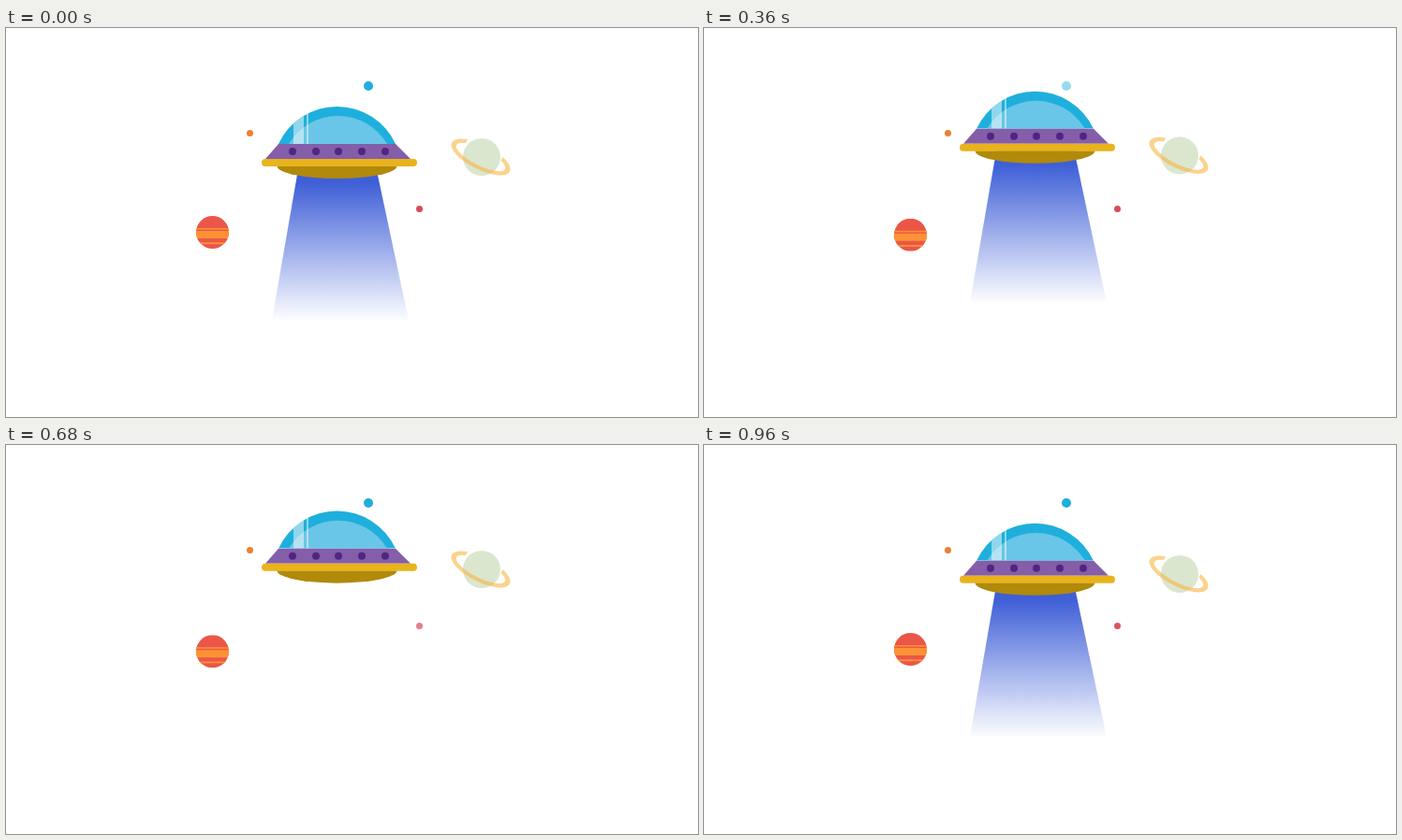
These frames come from a looping animation (739x416 px, 1 s). An HTML page:

```html
<!DOCTYPE html>
<html lang="en">
<head>
<meta charset="utf-8">
<title>Flying saucer</title>
<style>
  html, body { margin: 0; width: 100%; height: 100%; overflow: hidden; background: #fff; }
  svg { display: block; width: 739px; height: 416px; }
</style>
</head>
<body>
<svg viewBox="0 0 739 416">
  <defs>
    <linearGradient id="glow" gradientUnits="userSpaceOnUse" x1="0" y1="165" x2="0" y2="314">
      <stop offset="0" stop-color="#3f5fd7"/>
      <stop offset="1" stop-color="#3f5fd7" stop-opacity="0"/>
    </linearGradient>
    <clipPath id="domeClip"><path d="M291 124A68.8 68.8 0 0 1 416 124Z"/></clipPath>
    <clipPath id="marsClip"><circle cx="220.5" cy="218.5" r="17.5"/></clipPath>
  </defs>

  <circle id="cyan" cx="387" cy="62" r="5" fill="#1fafdc"/>
  <circle id="orange" cx="260.5" cy="112.5" r="3.5" fill="#ec8036"/>
  <circle id="red" cx="441.5" cy="193.5" r="3.5" fill="#d94a5b"/>

  <g id="mars" clip-path="url(#marsClip)">
    <rect x="203" y="201" width="35" height="35" fill="#eb5648"/>
    <g fill="#fd9235">
      <rect x="203" y="214" width="35" height="1.6"/>
      <rect x="203" y="217" width="35" height="8"/>
      <rect x="203" y="229.3" width="35" height="1.8"/>
    </g>
  </g>

  <g id="saturn">
    <circle cx="508" cy="138" r="20" fill="#dbe6cf"/>
    <!-- Open ring: the far side stops short of the globe -->
    <path transform="translate(507 138) rotate(26.6)" fill="#f9b443" fill-opacity=".6"
      d="M-21 -10.6A34.6 13.3 0 1 0 21 -10.6L21 -6.2A29 9 0 1 1 -21 -6.2Z"/>
  </g>

  <path id="beam" d="M312.5 148H395L430 312.5H284Z" fill="url(#glow)"/>

  <g id="ufo">
    <g clip-path="url(#domeClip)">
      <rect x="285" y="80" width="137" height="44" fill="#1fafdc"/>
      <path d="M302 124A61 61 0 0 1 407 124Z" fill="#69c6e8"/>
      <path d="M307 84H318V124H307ZM321 84H323V124H321Z" fill="#fff" fill-opacity=".5"/>
    </g>
    <path d="M291 124H416L432 140H277Z" fill="#845ea8"/>
    <g fill="#4f2682">
      <circle cx="306" cy="132" r="4"/>
      <circle cx="331" cy="132" r="4"/>
      <circle cx="355" cy="132" r="4"/>
      <circle cx="380" cy="132" r="4"/>
      <circle cx="405" cy="132" r="4"/>
    </g>
    <path d="M289.5 147.5H417.5A64 13.5 0 0 1 289.5 147.5Z" fill="#b1890b"/>
    <rect x="273" y="140" width="166" height="8" rx="4" fill="#e8b31c"/>
  </g>
</svg>
<script>
  const LOOP = 1000, STEP = 40;
  const [ufo, beam, mars, saturn, cyan, orange, red] =
    ['ufo', 'beam', 'mars', 'saturn', 'cyan', 'orange', 'red']
      .map(id => document.getElementById(id));

  // Smooth rise from 0 at start to 1 at peak and back to 0 at end.
  function swell(t, start, peak, end) {
    if (t <= start || t >= end) return 0;
    const u = t < peak ? (t - start) / (peak - start) : (end - t) / (end - peak);
    return (1 - Math.cos(Math.PI * u)) / 2;
  }

  const blink = (t, mid, half) => Math.min(1, Math.abs(t - mid) / half);
  const shift = (node, y) => node.setAttribute('transform', `translate(0 ${y.toFixed(2)})`);
  const fade = (node, a) => node.setAttribute('opacity', a.toFixed(3));

  function draw(now) {
    const t = Math.floor((now % LOOP) / STEP + 0.001) * STEP;
    const lift = swell(t, 0, 493, 986);
    shift(ufo, -19.5 * lift);
    shift(beam, -22.5 * lift);
    shift(mars, 3.3 * lift);
    shift(saturn, -5 * swell(t, 150, 690, 970));

    // The beam cuts out briefly twice per loop.
    const beat = t % 520;
    fade(beam, beat >= 120 && beat < 240 ? 0 : 1);

    fade(orange, blink(t, 190, 130));
    fade(cyan, blink(t, 300, 130));
    fade(red, blink(t, 800, 170));
  }

  function tick(now) {
    draw(now);
    requestAnimationFrame(tick);
  }
  draw(0);
  requestAnimationFrame(tick);
</script>
</body>
</html>
```
